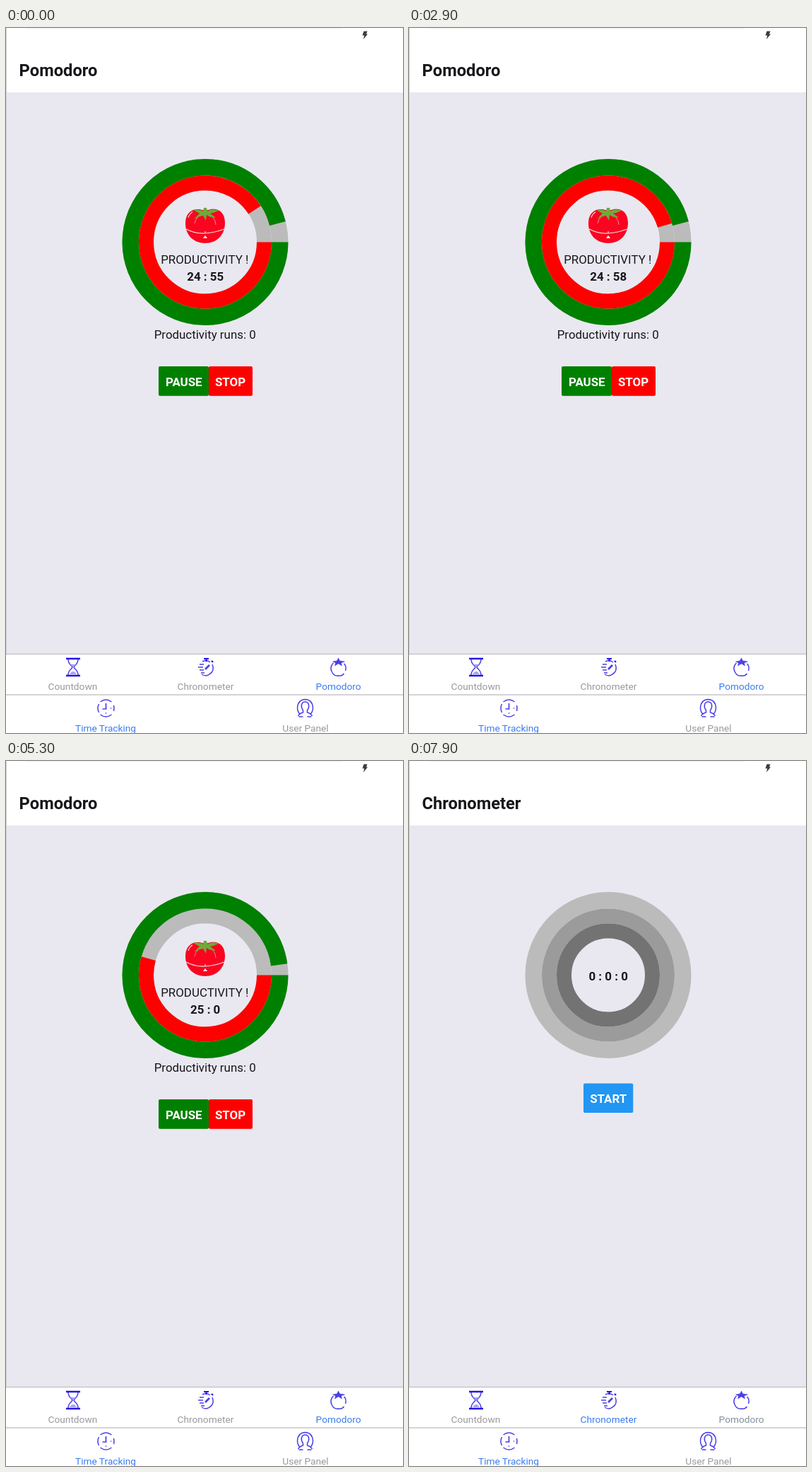
An HTML page that plays this animation: 562x996 px, repeating every 8000 ms.

```html
<!DOCTYPE html>
<html lang="en">
<head>
<meta charset="utf-8">
<title>Pomodoro</title>
<style>
  html, body { margin: 0; width: 100%; height: 100%; overflow: hidden; background: #fff; }
  svg { display: block; width: 100%; height: 100%; }
  text { font: 16.9px Roboto, sans-serif; fill: #17171b; }
  .mid { text-anchor: middle; }
  .bold { font-weight: 700; }
  .title { font-size: 23.7px; font-weight: 700; }
  .label { font-size: 13.7px; fill: #99999e; text-anchor: middle; }
  .label.on { fill: #3b7cf0; }
  .label.fading { fill: #8290a0; }
  .button { fill: #fff; font-weight: 700; text-anchor: middle; }
  .ring { fill: none; stroke: #bbb; }
  .outer { stroke-width: 23.5; }
  .inner { stroke-width: 21; }
  .icon { fill: none; stroke: #4a3fe6; stroke-width: 1.5; }
</style>
</head>
<body>
<svg viewBox="0 0 562 996">
  <rect width="562" height="996" fill="#fff"/>
  <path d="M28 .5H476" stroke="#f3f3f3"/>
  <path d="M506.500 4.500h5l-1.500 4h2l-6 7.500 1.200-5.500h-2.700z" fill="#3c3c3c"/>
  <text id="title" class="title" x="18.600" y="67.700">Pomodoro</text>
  <rect y="91" width="562" height="793" fill="#e9e8f0"/>
  <path d="M.5 0V884" stroke="#d2d2d6"/>

  <g id="pomodoro">
    <circle class="ring outer" cx="282" cy="302.500" r="105.750"/>
    <circle class="ring inner" cx="282" cy="302.500" r="83.500"/>
    <circle id="minutes" class="ring outer" cx="282" cy="302.500" r="105.750" pathLength="360"/>
    <circle id="seconds" class="ring inner" cx="282" cy="302.500" r="83.500" pathLength="360"/>

    <path d="M254 276C254 262 262 255 274 256Q282 259 290 256C302 254 310 262 310 275C310 293 298 304 282 304S254 293 254 276Z" fill="#fa0420"/>
    <path d="M255 284Q268 291 282 290T309 284M282 290v-3M258 268q2-6 6-8" fill="none" stroke="#f4dfe6" stroke-width="1.100"/>
    <path d="M267 276q1-6 5-9M297 278q0-6-4-10" fill="none" stroke="#f6a9ae" stroke-width=".8"/>
    <path d="M279 297l3-4 3 4z" fill="#fff"/>
    <path d="M265 257Q273 255 279 259L280 254H284L285 259Q292 254 301 258Q295 261 289 262L297 268Q289 268 284 264L283 272L279 265Q273 266 266 270L274 262Z" fill="#6dab3c"/>

    <text id="phase" y="332.800"></text>
    <text id="clock" class="mid bold" x="282.200" y="357"></text>
    <text id="runs" x="209.700" y="438.600"></text>
    <rect x="216" y="478" width="71" height="41.700" rx="2" fill="#008000"/>
    <rect x="287" y="478" width="62" height="41.700" rx="2" fill="#f00"/>
    <text class="button" x="251.800" y="505.800">PAUSE</text>
    <text class="button" x="317.500" y="505.800">STOP</text>
  </g>

  <g id="chronometer">
    <circle class="ring outer" cx="282" cy="302.500" r="105.750"/>
    <circle class="ring inner" cx="282" cy="302.500" r="83.500" style="stroke:#9b9b9b"/>
    <circle class="ring inner" cx="282" cy="302.500" r="62.500" style="stroke:#737373"/>
    <text class="mid bold" x="282.200" y="309.700">0 : 0 : 0</text>
    <rect x="247" y="455.500" width="70.300" height="41.500" rx="2" fill="#2196f3"/>
    <text class="button" x="282.200" y="483">START</text>
  </g>

  <rect y="884" width="562" height="112" fill="#fff"/>
  <path d="M0 884.500H562M0 942H562" stroke="#c6c6c9" stroke-width="1.300"/>

  <g class="icon" transform="translate(95 903)">
    <path d="M-10-12H10M-10 12H10" stroke="#2414e6" stroke-width="2.400"/>
    <path d="M-7-11C-7-4-2-3-1 0C-2 3-7 4-7 11M7-11C7-4 2-3 1 0C2 3 7 4 7 11"/>
    <path d="M-4-4H4L0 0ZM-5 10Q0 2 5 10Z" fill="#a9a4f3" stroke="none"/>
  </g>
  <g class="icon" transform="translate(283 903)">
    <path d="M-5-8Q1-11 6-7M9-4Q13 5 5 10Q0 14-6 10"/>
    <path d="M-3-12H4M.5-11V-8M8-9l2 2" stroke="#2414e6" stroke-width="2.200"/>
    <path d="M-9-4H-3M-11 0H-4M-9 4H-3M-7 8H-2"/>
    <path d="M-1 3L5-3" stroke-width="2.600"/>
  </g>
  <g class="icon" transform="translate(470.500 903)">
    <path d="M-7-6Q-13 0-9 7Q-6 13 0 12Q5 13 8 9M10 5Q12-1 8-5"/>
    <path d="M-8-8L-2-9L0-13L2-9L9-8L4-6L5-2L0-5L-5-2L-4-6Z" fill="#4a3fe6" stroke-width=".5"/>
  </g>
  <g class="icon" transform="translate(141.500 961)">
    <path d="M-8-9Q0-15 8-9M11-4Q12 0 11 4M8 9Q0 15-8 9M-10 6Q-13 0-10-6"/>
    <path d="M0-7V1M-5 1H1" stroke-width="1.700"/>
    <path d="M6 0h2M0 6v2" stroke-width="1"/>
  </g>
  <g class="icon" transform="translate(423.500 961)">
    <path d="M-7 9Q-11 5-11-1Q-10-12 0-12.500Q10-12 11-1Q11 5 7 9"/>
    <path d="M-10 11Q-8 7-3 6V3Q-6-1-5-5Q-4-9 0-9T5-5Q6-1 3 3V6Q8 7 10 11M-9 12H-3M3 12H9"/>
  </g>

  <text class="label" x="94.400" y="935.200">Countdown</text>
  <text id="tabChrono" class="label" x="282.400" y="935.200">Chronometer</text>
  <text id="tabPomo" class="label" x="470.600" y="935.200">Pomodoro</text>
  <text class="label on" x="141" y="993.600">Time Tracking</text>
  <text class="label" x="424" y="993.600">User Panel</text>
</svg>

<script>
const LOOP = 8000, STEP = 100, REST = 5900, SWITCH = 7800;
const $ = id => document.getElementById(id);

// [time in ms, arc in degrees]
const secondsArc = [
  [0, 327], [100, 329.5], [500, 329.5], [1400, 335.5], [1500, 335.5],
  [2300, 341.5], [2600, 341.5], [3500, 347.5], [4200, 353.4],
  [4900, 353.4], [5800, 0], [5900, 0], [6500, 6], [6600, 6], [7400, 12]
];
const minutesArc = [[4900, 345.6], [5800, 360], [5900, 360], [6500, 0]];

const clockTexts = [
  [0, "24 : 55"], [600, "24 : 56"], [1700, "24 : 57"], [2700, "24 : 58"],
  [3700, "24 : 59"], [4700, "25 : 0"], [5900, "0 : 1"], [6700, "0 : 2"]
];

function lerpKeys(keys, t) {
  const next = keys.findIndex(key => key[0] > t);
  if (next === 0) return keys[0][1];
  if (next < 0) return keys[keys.length - 1][1];
  const [t0, a] = keys[next - 1], [t1, b] = keys[next];
  return a + (b - a) * (t - t0) / (t1 - t0);
}

function setText(id, value) {
  const el = $(id);
  if (el.textContent !== value) el.textContent = value;
}

function setArc(id, degrees, color) {
  const el = $(id);
  el.style.stroke = color;
  el.style.visibility = degrees > 0 ? "visible" : "hidden";
  el.setAttribute("stroke-dasharray", `${degrees} 720`);
}

function draw(t) {
  const chrono = t >= SWITCH, rest = t >= REST;
  $("pomodoro").style.display = chrono ? "none" : "";
  $("chronometer").style.display = chrono ? "" : "none";
  setText("title", chrono ? "Chronometer" : "Pomodoro");
  $("tabChrono").setAttribute("class", chrono ? "label on" : "label");
  $("tabPomo").setAttribute("class", chrono ? "label fading" : "label on");
  if (chrono) return;

  setArc("minutes", lerpKeys(minutesArc, t), rest ? "#1e90ff" : "#008000");
  setArc("seconds", lerpKeys(secondsArc, t), rest ? "#00f" : "#f00");
  setText("phase", rest ? "REST !" : "PRODUCTIVITY !");
  $("phase").setAttribute("x", rest ? 245.8 : 219.2);
  setText("clock", clockTexts.filter(key => key[0] <= t).pop()[1]);
  setText("runs", `Productivity runs: ${rest ? 1 : 0}`);
}

function tick() {
  const t = performance.now() % LOOP;
  draw(Math.floor(t / STEP) * STEP);
  requestAnimationFrame(tick);
}
tick();
</script>
</body>
</html>
```
